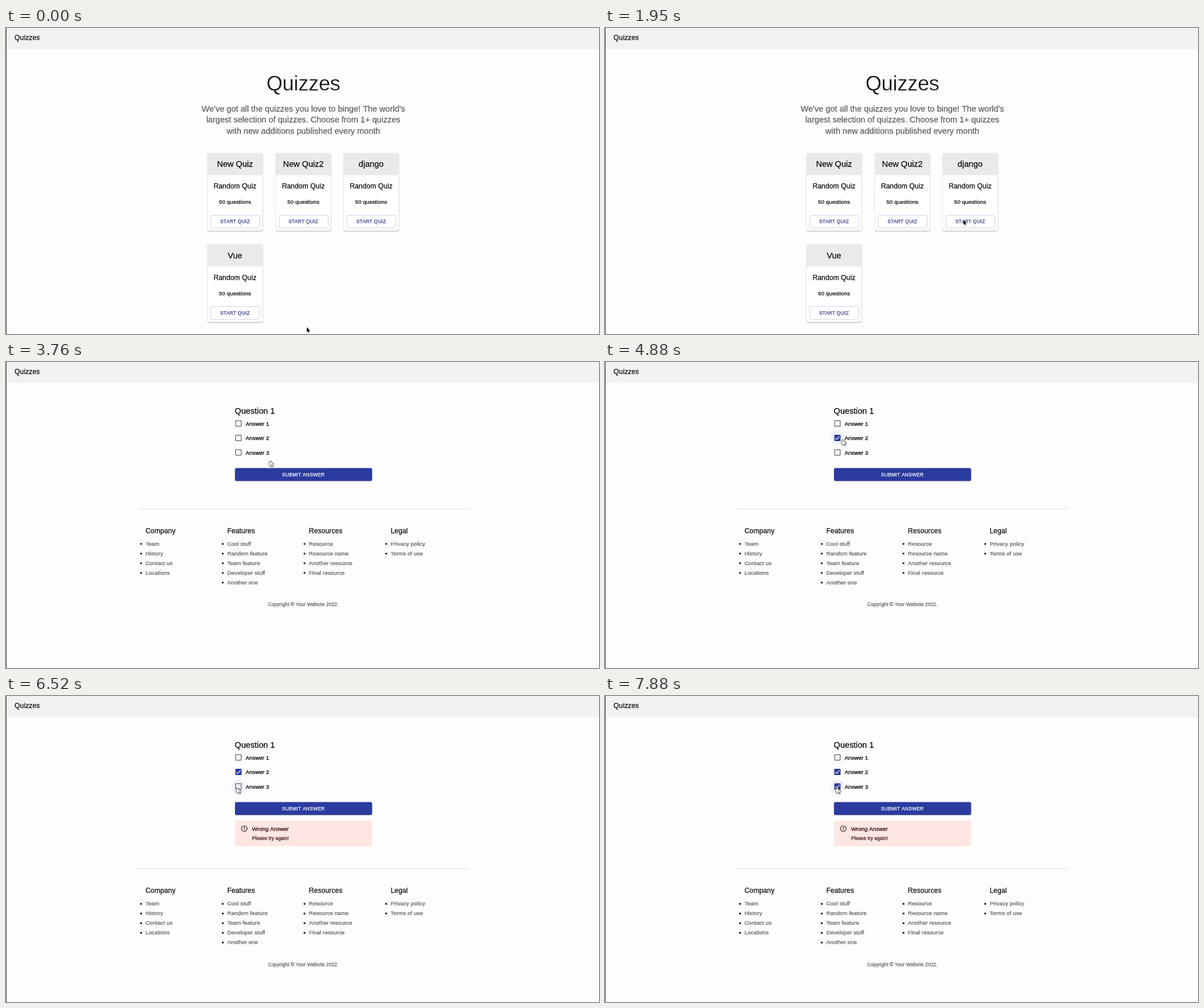
Animation of 1041x538 px, one loop 8000 ms. Source, as an HTML page with a canvas:

```html
<!DOCTYPE html>
<html lang="en">
<head>
<meta charset="utf-8">
<title>Quizzes</title>
<style>
html, body { margin: 0; width: 100%; height: 100%; overflow: hidden; background: #fdfdfd; }
canvas { display: block; width: 1041px; height: 538px; }
</style>
</head>
<body>
<canvas id="stage"></canvas>
<script>
const W = 1041, H = 538, MID = 522, LOOP = 8000;
const REM = 9.72;
const INK = '#0c0c0c', MUTED = '#5f5f5f', BROWN = '#3d1411';
const BLUE = '#2b3b9f', BLUE_DARK = '#212d79', BLUE_TEXT = '#303a88', PAPER = '#fdfdfd';
const PAGE_SWITCH = 2740, CHECK_2 = 4880, ALERT = 5600, CHECK_3 = 6920;

const canvas = document.getElementById('stage');
const ctx = canvas.getContext('2d');
const dpr = window.devicePixelRatio || 1;
canvas.width = Math.round(W * dpr);
canvas.height = Math.round(H * dpr);

// Size in rem, letter spacing in em.
const TYPE = {
  h2: { rem: 3.75, em: -0.008 },
  h5: { rem: 1.5, em: 0 },
  h6: { rem: 1.25, em: 0.0075 },
  body: { rem: 1, em: 0.009 },
  small: { rem: 0.875, em: 0.01 },
  button: { rem: 0.875, em: 0.028 }
};

function text(str, x, y, type, color = INK, align = 'left', weight = 0.25) {
  const size = TYPE[type].rem * REM;
  ctx.font = `${size}px "Liberation Sans", Arial, sans-serif`;
  ctx.letterSpacing = `${TYPE[type].em * size}px`;
  ctx.textAlign = align;
  ctx.fillStyle = ctx.strokeStyle = color;
  ctx.lineWidth = weight;
  ctx.fillText(str, x, y);
  if (weight) ctx.strokeText(str, x, y);
}

function rect(x, y, w, h, color) {
  ctx.fillStyle = color;
  ctx.fillRect(x, y, w, h);
}

function box(x, y, w, h, r, fill, stroke, width = 1) {
  ctx.beginPath();
  ctx.roundRect(x, y, w, h, r);
  ctx.lineWidth = width;
  if (stroke) {
    ctx.strokeStyle = stroke;
    ctx.stroke();
  }
  if (fill) {
    ctx.fillStyle = fill;
    ctx.fill();
  }
}

function disc(x, y, r, color) {
  ctx.beginPath();
  ctx.arc(x, y, r, 0, Math.PI * 2);
  ctx.fillStyle = color;
  ctx.fill();
}

function raised(x, y, w, h, fill) {
  ctx.save();
  ctx.shadowColor = 'rgba(0,0,0,0.4)';
  ctx.shadowBlur = 1.6 * dpr;
  ctx.shadowOffsetY = 0.8 * dpr;
  box(x, y, w, h, 2.4, fill);
  ctx.restore();
}

function frame() {
  rect(0, 0, W, H, PAPER);
  rect(0, 0, W, 37, '#f2f2f2');
  text('Quizzes', 15, 21, 'h6');
  rect(0, 0, 1, H, '#44434a');
}

function card(title, x, y, hover) {
  const mid = x + 48;
  const centered = (str, dy, type, color) => text(str, mid, y + dy, type, color, 'center');
  raised(x, y, 96.5, 136.5, '#fff');
  box(x, y, 96.5, 38.8, [2.4, 2.4, 0, 0], '#eaeaea');
  centered(title, 24, 'h5');
  centered('Random Quiz', 62, 'h6');
  centered('50 questions', 89, 'body');
  box(x + 5.5, y + 109.5, 85.5, 22, 2.4, hover ? '#f5f6fb' : '#fff', '#a3a8cb');
  centered('START QUIZ', 123, 'button', BLUE_TEXT);
}

function listPage(t) {
  text('Quizzes', MID, 110, 'h2', INK, 'center', 0);
  // Thin the large title to a lighter weight.
  ctx.strokeStyle = PAPER;
  ctx.lineWidth = 0.45;
  ctx.strokeText('Quizzes', MID, 110);
  [
    "We've got all the quizzes you love to binge! The world's",
    'largest selection of quizzes. Choose from 1+ quizzes',
    'with new additions published every month'
  ].forEach((line, i) => text(line, MID, Math.round(147 + i * 19.4), 'h5', MUTED, 'center'));
  ['New Quiz', 'New Quiz2', 'django', 'Vue'].forEach((title, i) => {
    const x = Math.round(354 + (i % 3) * 119.7);
    card(title, x, i < 3 ? 220 : 380.5, i === 2 && t >= 2080);
  });
}

function checkbox(row, checked, hover) {
  const x = 408, y = 108 + row * 25.5;
  if (hover) disc(x, y, 12.7, 'rgba(43,59,159,0.05)');
  if (checked) {
    box(x - 5.5, y - 5.5, 11, 11, 1.3, BLUE);
    ctx.beginPath();
    ctx.moveTo(x - 3.8, y + 0.3);
    ctx.lineTo(x - 1.2, y + 2.7);
    ctx.lineTo(x + 3.8, y - 2.8);
    ctx.strokeStyle = '#fff';
    ctx.lineWidth = 1.2;
    ctx.stroke();
  } else {
    box(x - 4.9, y - 4.9, 9.8, 9.8, 0.7, null, '#5c5c5c', 1.25);
  }
  text(`Answer ${row + 1}`, 420.7, y + 3.5, 'body', INK, 'left', 0.35);
}

function alertBox() {
  box(402, 219, 240.6, 45, 2.4, '#fde6e3');
  box(413.4, 228.2, 10, 10, 5, null, BROWN, 1.1);
  rect(417.8, 230.2, 1.2, 3.8, BROWN);
  rect(417.8, 235, 1.2, 1.2, BROWN);
  text('Wrong Answer', 432, 236.5, 'body', BROWN, 'left', 0.35);
  text('Please try again!', 432, 253, 'small', BROWN);
}

const FOOTER = {
  Company: ['Team', 'History', 'Contact us', 'Locations'],
  Features: ['Cool stuff', 'Random feature', 'Team feature', 'Developer stuff', 'Another one'],
  Resources: ['Resource', 'Resource name', 'Another resource', 'Final resource'],
  Legal: ['Privacy policy', 'Terms of use']
};

function footer(dy) {
  rect(231, 257.4 + dy, 582.5, 1, '#dedede');
  Object.entries(FOOTER).forEach(([head, items], col) => {
    const x = 245 + col * 143.4;
    text(head, x, 300.7 + dy, 'h6');
    items.forEach((item, i) => {
      const y = 322.6 + dy + i * 17;
      disc(x - 7.8, y - 2.8, 1.65, INK);
      text(item, x, y, 'body', MUTED);
    });
  });
  text('Copyright © Your Website 2022.', MID, 429.3 + dy, 'small', MUTED, 'center');
}

const within = (v, a, b) => v >= a && v < b;

function quizPage(t, cur) {
  const overSubmit = within(cur.y, 186, 209) && within(cur.x, 402, 643);
  const overRow = row => cur.x < 463 && Math.abs(cur.y - 110 - row * 25.5) < 11;
  text('Question 1', 401.6, 91, 'h5');
  checkbox(0, false, overRow(0));
  checkbox(1, t >= CHECK_2, overRow(1));
  checkbox(2, t >= CHECK_3, overRow(2));
  raised(402, 186.5, 240.6, 22.4, overSubmit ? BLUE_DARK : BLUE);
  text('SUBMIT ANSWER', MID, 200.5, 'button', '#fff', 'center');
  if (t >= ALERT) alertBox();
  footer(t >= ALERT ? 45.6 : 0);
}

function statusBubble() {
  box(-3, 532.5, 93.3, 12, 2.4, '#232327');
  text('localhost:3000/t/django', 3, 541.3, 'small', '#e6e6e6');
}

// Pointer moves; those without a duration are jumps.
const MOVES = [
  { at: 70, x: 629, y: 337, lasts: 760 },
  { at: PAGE_SWITCH, x: 622, y: 343, lasts: 60 },
  { at: 3290, x: 492, y: 187, lasts: 270 },
  { at: 3700, x: 425, y: 144, lasts: 320 },
  { at: 4290, x: 418, y: 137, lasts: 190 },
  { at: 5080, x: 500, y: 196 },
  { at: 6190, x: 407, y: 162 },
  { at: CHECK_3, x: 440, y: 196, lasts: 280 },
  { at: 7380, x: 408, y: 162, lasts: 300 }
];

// x settles sooner than y, which bends each path.
function pointer(t) {
  let x = 528, y = 526;
  for (const move of MOVES) {
    if (t < move.at) break;
    const left = move.lasts ? Math.max(0, 1 - (t - move.at) / move.lasts) : 0;
    x = move.x + (x - move.x) * left ** 2.5;
    y = move.y + (y - move.y) * left ** 1.65;
  }
  return { x, y };
}

const ARROW = new Path2D('M0 0V8.8L1.9 7.1L3.2 10L4.6 9.4L3.4 6.6L6 6.3Z');
const HAND = new Path2D('M-1 .5Q0-.8 1 .5L1.5 3.2Q5 3 5.2 5L4.4 9.6H.2L-2.8 6.3Q-2-4.8-.2 6Z');

function drawPointer({ x, y }, hand) {
  const shape = hand ? HAND : ARROW;
  ctx.save();
  ctx.translate(x, y);
  ctx.lineJoin = 'round';
  ctx.lineWidth = 1.4;
  ctx.strokeStyle = hand ? '#222' : '#fff';
  ctx.fillStyle = hand ? '#fff' : '#000';
  ctx.stroke(shape);
  ctx.fill(shape);
  if (hand) for (let i = 0; i < 3; i++) rect(0.6 + i * 1.3, 6, 0.6, 2.4, '#222');
  ctx.restore();
}

function render(now) {
  const t = now % LOOP;
  const cur = pointer(t);
  ctx.setTransform(dpr, 0, 0, dpr, 0, 0);
  frame();
  if (t < PAGE_SWITCH) listPage(t);
  else quizPage(t, cur);
  if (within(t, 2410, 2950)) statusBubble();
  drawPointer(cur, within(t, 2080, PAGE_SWITCH) || t >= 3560);
  requestAnimationFrame(render);
}

requestAnimationFrame(render);
</script>
</body>
</html>
```
